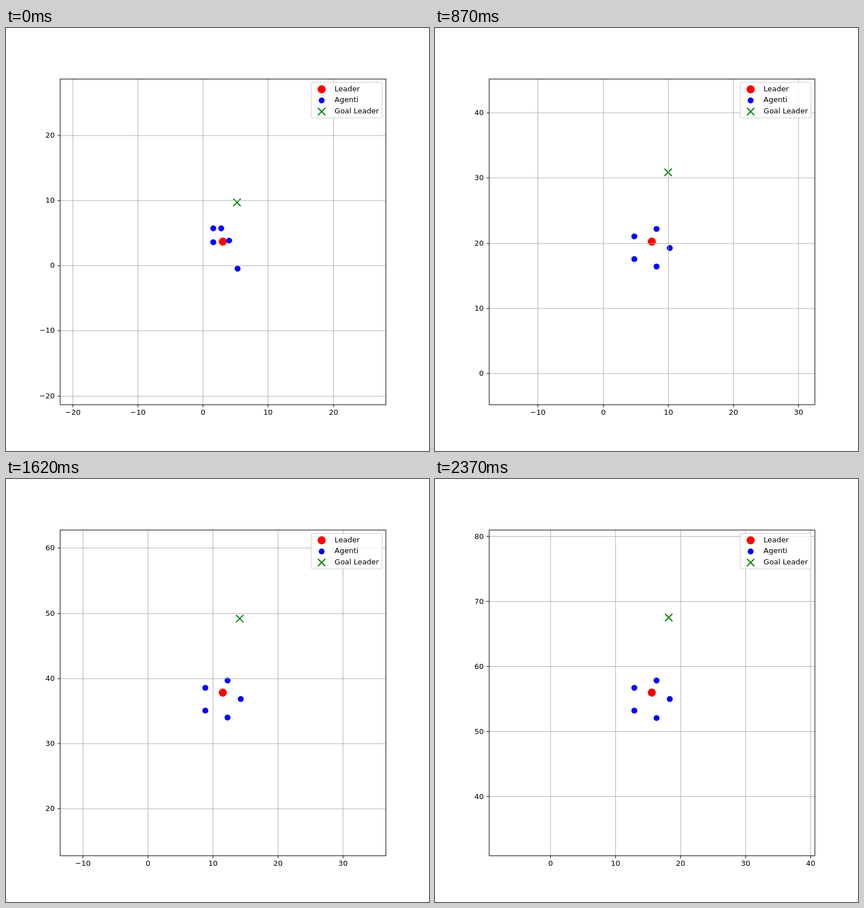
An HTML page with a canvas that plays this animation: 748x748 px, repeating every 2400 ms.

```html
<!DOCTYPE html>
<html lang="it">
<head>
<meta charset="utf-8">
<title>Leader e agenti</title>
<style>
  html, body { margin: 0; width: 100%; height: 100%; overflow: hidden; background: #fff; }
  canvas { display: block; }
</style>
</head>
<body>
<canvas id="plot" width="748" height="748"></canvas>
<script>
const ctx = document.getElementById('plot').getContext('2d');
const STEP = 30, STEPS = 80;

// Layout on an 800-unit figure at 100 dpi
const LEFT = 102, TOP = 96, SIZE = 616, SPAN = 50;
const RIGHT = LEFT + SIZE, BOTTOM = TOP + SIZE;
const UNIT = SIZE / SPAN, CX = LEFT + SIZE / 2, CY = TOP + SIZE / 2;
const pt = n => n * 100 / 72;

// Goal moves straight; the leader closes its gap exponentially.
const goalStart = [5.28, 9.66], goalSpeed = [0.1637, 0.7318];
const gapStart = [2.21, 5.99], gapEnd = [2.59, 11.57], GAP_DECAY = 0.939;

// Agents settle on a pentagon that trails the leader.
const RADIUS = 3, TRAIL = 1.39, AGENT_DECAY = 0.58;
const agentStart = [[0.97, 0.16], [-0.22, 2.02], [-1.45, 2.02], [-1.45, -0.08], [2.29, -4.14]];

function pose(n) {
  const decay = GAP_DECAY ** n, settle = AGENT_DECAY ** n;
  const gap = gapEnd.map((end, k) => end + (gapStart[k] - end) * decay);
  const leader = gap.map((g, k) => goalStart[k] + goalSpeed[k] * n - g);
  const speed = goalSpeed.map((v, k) =>
    v - (gapEnd[k] - gapStart[k]) * decay * (1 - GAP_DECAY) / GAP_DECAY);
  const agents = agentStart.map((start, i) => {
    const a = i * 2 * Math.PI / 5;
    return [Math.cos(a), Math.sin(a)].map((c, k) => {
      const slot = RADIUS * c - TRAIL * speed[k];
      return slot + (start[k] - slot) * settle;
    });
  });
  return { gap, leader, agents };
}

function line(x1, y1, x2, y2) {
  ctx.beginPath();
  ctx.moveTo(x1, y1);
  ctx.lineTo(x2, y2);
  ctx.stroke();
}

function dot(x, y, area, color) {
  ctx.fillStyle = color;
  ctx.beginPath();
  ctx.arc(x, y, pt(Math.sqrt(area) / 2 + 0.5), 0, 2 * Math.PI);
  ctx.fill();
}

function cross(x, y) {
  const r = pt(5);
  ctx.strokeStyle = '#008000';
  ctx.lineWidth = pt(1.5);
  line(x - r, y - r, x + r, y + r);
  line(x - r, y + r, x + r, y - r);
}

function text(str, x, y, align) {
  ctx.fillStyle = '#000';
  ctx.textAlign = align;
  ctx.fillText(str, x, y);
}

const leaderDot = (x, y) => dot(x, y, 100, '#f00');
const agentDot = (x, y) => dot(x, y, 50, '#00f');
const place = (draw, [dx, dy]) => draw(Math.round(CX + dx * UNIT), Math.round(CY - dy * UNIT));

// Calls draw(label, position) for every multiple of ten in view.
function eachTick(center, toPixel, draw) {
  const low = center - SPAN / 2, high = center + SPAN / 2;
  for (let v = Math.ceil(low / 10) * 10; v <= high; v += 10)
    draw(String(v).replace('-', '\u2212'), Math.round(toPixel(v - center)) + 0.5);
}

function drawAxes([x, y]) {
  const tick = pt(3.5);
  const grid = () => { ctx.strokeStyle = '#b0b0b0'; };
  const ink = () => { ctx.strokeStyle = '#000'; };
  ctx.lineWidth = pt(0.8);
  eachTick(x, d => CX + d * UNIT, (label, px) => {
    grid(); line(px, TOP, px, BOTTOM);
    ink(); line(px, BOTTOM, px, BOTTOM + tick + 0.5);
    text(label, px, 732, 'center');
  });
  eachTick(y, d => CY - d * UNIT, (label, py) => {
    grid(); line(LEFT, py, RIGHT, py);
    ink(); line(LEFT - tick + 0.5, py, LEFT, py);
    text(label, LEFT - 2 * tick, Math.round(py + 4.5), 'right');
  });
  ink();
  ctx.strokeRect(LEFT + 0.5, TOP + 0.5, SIZE, SIZE);
}

function drawLegend() {
  ctx.beginPath();
  ctx.roundRect(577.3, 103, 134, 67, pt(2));
  ctx.fillStyle = 'rgba(255,255,255,.8)';
  ctx.fill();
  ctx.strokeStyle = 'rgba(204,204,204,.8)';
  ctx.lineWidth = pt(1);
  ctx.stroke();
  leaderDot(597, 116);
  agentDot(597, 137);
  cross(597, 158);
  text('Leader', 621.5, 120, 'left');
  text('Agenti', 621.5, 140, 'left');
  text('Goal Leader', 621.5, 161, 'left');
}

function draw(n) {
  const { gap, leader, agents } = pose(n);
  ctx.setTransform(0.935, 0, 0, 0.935, 0, 0);
  ctx.font = pt(10) + 'px "DejaVu Sans", sans-serif';
  ctx.fillStyle = '#fff';
  ctx.fillRect(0, 0, 800, 800);
  place(leaderDot, [0, 0]);
  agents.forEach(a => place(agentDot, a));
  place(cross, gap);
  drawAxes(leader);
  drawLegend();
}

const start = performance.now();
function loop() {
  draw(Math.floor((performance.now() - start) / STEP) % STEPS);
  requestAnimationFrame(loop);
}
loop();
</script>
</body>
</html>
```
